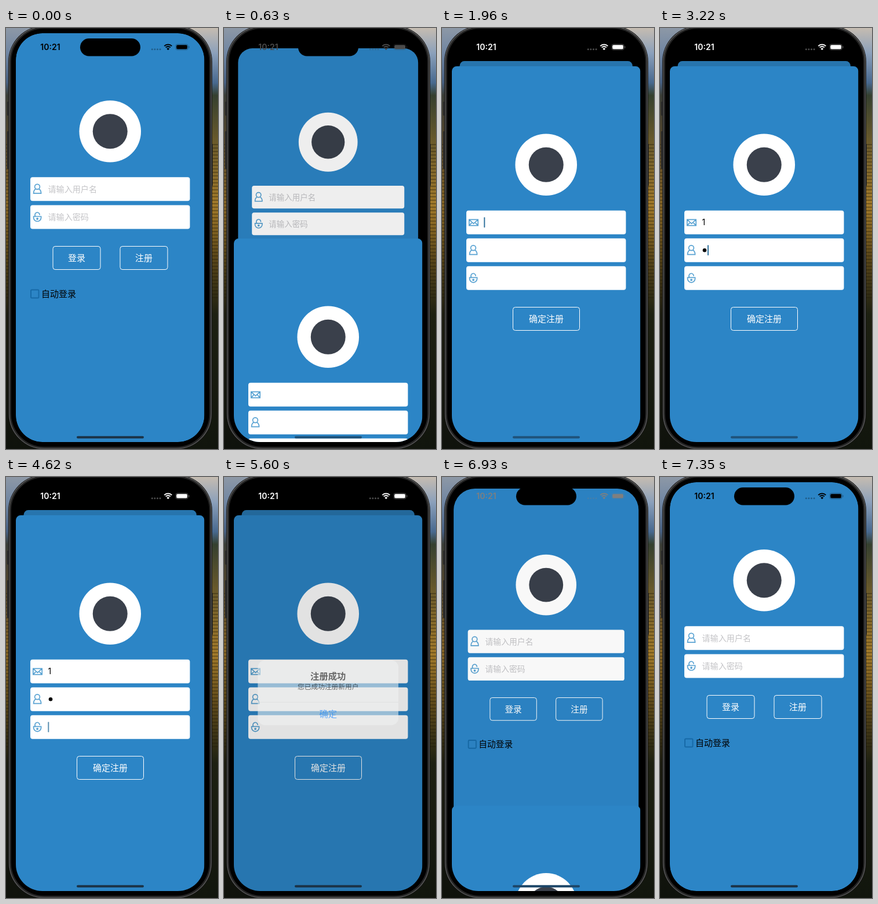
Animation, 366 px wide and 726 px high, one loop 8000 ms. Source, as an HTML page with a canvas:

```html
<!DOCTYPE html>
<html lang="zh">
<head>
<meta charset="utf-8">
<title>注册</title>
<style>
html, body { margin: 0; width: 100%; height: 100%; overflow: hidden; background: #000; }
canvas { display: block; width: 366px; height: 726px; }
</style>
</head>
<body>
<canvas id="stage"></canvas>
<script>
const W = 366, H = 726, LOOP = 8000;
const BLUE = '#2c85c6', ICON = '#58a2d2', CARET = '#35759f';
const CJK = '"Noto Sans CJK SC", "Noto Sans CJK", "Noto Sans", sans-serif';
const SCREEN = { x: 17, y: 9, w: 325.5, h: 705 };
const CX = 179.75;

const canvas = document.getElementById('stage');
const dpr = window.devicePixelRatio || 1;
canvas.width = W * dpr;
canvas.height = H * dpr;
const ctx = canvas.getContext('2d');

// Critically damped spring, 0 to 1
function spring(t, start, rate) {
  const x = Math.max(0, t - start) / 1000 * rate;
  return 1 - (1 + x) * Math.exp(-x);
}
const clamp = v => Math.min(1, Math.max(0, v));
const mix = (a, b, p) => a + (b - a) * p;
const within = (t, a, b) => t >= a && t < b;
const snap = (v, e) => v < e ? 0 : v > 1 - e ? 1 : v;

function box(x, y, w, h, r) {
  ctx.beginPath();
  ctx.roundRect(x, y, w, h, r);
}
function fillBox(x, y, w, h, r, color) {
  box(x, y, w, h, r);
  ctx.fillStyle = color;
  ctx.fill();
}
function strokeBox(x, y, w, h, r, color, width) {
  box(x, y, w, h, r);
  ctx.strokeStyle = color;
  ctx.lineWidth = width;
  ctx.stroke();
}
function disc(x, y, r, color) {
  ctx.beginPath();
  ctx.arc(x, y, r, 0, Math.PI * 2);
  ctx.fillStyle = color;
  ctx.fill();
}
function label(str, x, cy, size, color, align = 'left', weight = 400) {
  ctx.font = `${weight} ${size}px ${CJK}`;
  ctx.textAlign = align;
  ctx.fillStyle = color;
  ctx.fillText(str, x, cy + size * 0.38);
}

function wallpaper() {
  const strip = (x, w, colors) => {
    const g = ctx.createLinearGradient(0, 0, 0, H);
    const at = [0, 0.06, 0.13, 0.16, 0.27, 0.42, 0.54, 0.68, 1];
    colors.forEach((c, i) => g.addColorStop(at[i], c));
    ctx.fillStyle = g;
    ctx.fillRect(x, 0, w, H);
  };
  strip(0, 183, ['#8d98a6', '#7086a3', '#465f80', '#3a3d36', '#54462b', '#866526', '#564317', '#1c1c10', '#0f120c']);
  strip(183, 183, ['#c5bcb1', '#8ba0bb', '#48698f', '#35402f', '#6a5a2b', '#a27a2a', '#5d4819', '#1d2011', '#11150d']);
  ctx.fillStyle = 'rgba(30,24,8,.35)';
  for (let y = 200; y < 470; y += 6) ctx.fillRect(0, y, W, 2);
}

function phoneBody() {
  fillBox(1.8, 127, 4, 24, 1, '#2b2b2b');
  fillBox(1.8, 178, 4, 65, 1, '#2b2b2b');
  fillBox(354, 200, 3, 72, 1, '#2b2b2b');
  fillBox(4, -4, 352, 731, 62, '#161616');
  strokeBox(5.8, -2.2, 348.4, 727.4, 60, '#626262', 1.3);
  strokeBox(7.8, -0.2, 344.4, 723.4, 58, '#262626', 2);
  fillBox(9, 1, 342, 721, 57, '#000');
}

const icons = {
  user(y) {
    ctx.beginPath();
    ctx.arc(54, y - 4, 4.4, 0, Math.PI * 2);
    ctx.moveTo(51, y);
    ctx.quadraticCurveTo(47.6, y + 2, 47.6, y + 7.4);
    ctx.lineTo(60.6, y + 7.4);
    ctx.quadraticCurveTo(60.6, y + 2, 57, y);
    ctx.stroke();
  },
  lock(y) {
    ctx.beginPath();
    ctx.arc(54, y - 4, 4, Math.PI * 0.85, Math.PI * 2.05);
    ctx.moveTo(50, y - 4);
    ctx.lineTo(50, y - 1);
    ctx.moveTo(47.6, y - 1);
    ctx.lineTo(60.6, y - 1);
    ctx.arc(54.1, y + 1, 6.5, 0, Math.PI);
    ctx.closePath();
    ctx.stroke();
    disc(54.1, y + 3, 1.9, ICON);
  },
  mail(y) {
    ctx.beginPath();
    ctx.rect(46.8, y - 5, 15.4, 10.4);
    ctx.moveTo(46.8, y - 5);
    ctx.lineTo(54.5, y + 2);
    ctx.lineTo(62.2, y - 5);
    ctx.moveTo(46.8, y + 5.4);
    ctx.lineTo(51.8, y);
    ctx.moveTo(62.2, y + 5.4);
    ctx.lineTo(57.2, y);
    ctx.stroke();
  }
};

function field(cy, icon, hint) {
  fillBox(42, cy - 20.5, 275.5, 41, 4, '#fff');
  ctx.strokeStyle = ICON;
  ctx.lineWidth = 1.7;
  icons[icon](cy);
  if (hint) label(hint, 72.5, cy, 14.1, '#c4c4c7');
}
function button(str, x, y, w, pressed) {
  strokeBox(x + 0.5, y + 0.5, w - 1, 40, 4, '#fff', 1);
  label(str, x + w / 2, y + 20.5, 15, pressed ? 'rgba(255,255,255,.45)' : '#fff', 'center');
}
function badge(y) {
  disc(CX, y, 53.3, '#fff');
  disc(CX, y, 30, '#3a404b');
}
function caret(x, cy) {
  fillBox(x, cy - 9, 2, 18, 1, CARET);
}

function login(t, p) {
  const k = 1 - 0.083 * p;
  ctx.save();
  ctx.translate(CX, SCREEN.y + 48 * p);
  ctx.scale(k, k);
  ctx.translate(-CX, -SCREEN.y);
  box(SCREEN.x, SCREEN.y, SCREEN.w, SCREEN.h, mix(46, 9, p));
  ctx.clip();
  ctx.fillStyle = BLUE;
  ctx.fillRect(0, 0, W, H);
  badge(178.3);
  field(277.7, 'user', '请输入用户名');
  field(326, 'lock', '请输入密码');
  button('登录', 80.5, 376, 83);
  button('注册', 196.5, 376, 83, within(t, 140, 540));
  strokeBox(43, 451.5, 13.5, 14, 1.5, '#176aa8', 2);
  label('自动登录', 61, 458.3, 15, '#000');
  ctx.fillStyle = `rgba(0,0,0,${0.12 * p})`;
  ctx.fillRect(0, 0, W, H);
  ctx.restore();
}

function sheet(t, p) {
  ctx.save();
  ctx.translate(0, 650 * (1 - p));
  fillBox(SCREEN.x, 66, SCREEN.w, 670, [8.3, 8.3, 0, 0], BLUE);
  badge(235.7);
  const rows = [335.3, 383.3, 431.3];
  ['mail', 'user', 'lock'].forEach((name, i) => field(rows[i], name));
  button('确定注册', 122, 481, 116, within(t, 5250, 5450));

  if (within(t, 2380, 5450)) {
    ctx.font = '400 14.1px Inter, sans-serif';
    ctx.textAlign = 'left';
    ctx.fillStyle = '#000';
    ctx.fillText('1', 72.5, 340.4);
  }
  if (within(t, 3220, 5450)) disc(77, rows[1], 3.3, '#000');
  if (within(t, 4970, 5450)) disc(77, rows[2], 3.3, '#000');

  if (within(t, 1960, 2380)) caret(72.3, rows[0]);
  if (within(t, 2380, 2870)) caret(80, rows[0]);
  if (within(t, 2870, 3220)) caret(72.3, rows[1]);
  if (within(t, 3220, 3570)) caret(82, rows[1]);
  if (within(t, 4620, 4970) || within(t, 6580, 7350)) {
    ctx.globalAlpha = t < 6000 ? clamp(0.8 + (t - 4620) / 350) : 1;
    caret(72.3, rows[2]);
    ctx.globalAlpha = 1;
  }
  if (within(t, 4970, 5450)) caret(82, rows[2]);
  ctx.restore();
}

function statusBar(white) {
  const v = Math.round(255 * white), ink = `rgb(${v},${v},${v})`;
  fillBox(128, 18, 104, 30.5, 15.2, '#000');
  ctx.font = '600 14px Inter, sans-serif';
  ctx.textAlign = 'center';
  ctx.fillStyle = ink;
  ctx.fillText('10:21', 76.5, 38);

  ctx.globalAlpha = 0.3;
  for (let i = 0; i < 4; i++) disc(252.3 + i * 4.6, 36.7, 1.5, ink);
  strokeBox(292.9, 27.9, 21.4, 10, 3.2, ink, 0.9);
  fillBox(315.2, 31, 1.3, 4, 0.7, ink);
  ctx.globalAlpha = 1;
  fillBox(294.2, 29.2, 18.8, 7.4, 2, ink);

  ctx.strokeStyle = ink;
  ctx.lineWidth = 2;
  for (const r of [9.2, 5.7]) {
    ctx.beginPath();
    ctx.arc(279.8, 37.6, r, Math.PI * 1.25, Math.PI * 1.75);
    ctx.stroke();
  }
  ctx.beginPath();
  ctx.moveTo(279.8, 38.2);
  ctx.arc(279.8, 38.2, 3.4, Math.PI * 1.25, Math.PI * 1.75);
  ctx.closePath();
  ctx.fillStyle = ink;
  ctx.fill();
}

function alertBox(t, grow, alpha) {
  const k = 1.2 - 0.2 * grow;
  ctx.fillStyle = `rgba(0,0,0,${0.2 * alpha})`;
  ctx.fillRect(0, 0, W, H);
  ctx.save();
  ctx.globalAlpha = alpha;
  ctx.translate(CX, 372);
  ctx.scale(k, k);
  box(-111.6, -51.5, 223.2, 103, 11.5);
  ctx.clip();
  ctx.fillStyle = '#f0f2f3';
  ctx.fillRect(-112, -52, 224, 104);
  if (within(t, 6160, 6300)) {
    ctx.fillStyle = '#dfe2e4';
    ctx.fillRect(-112, 15, 224, 37);
  }
  ctx.fillStyle = '#c9cccf';
  ctx.fillRect(-112, 14.6, 224, 0.6);
  label('注册成功', 0, -26.7, 14.1, '#000', 'center', 700);
  label('您已成功注册新用户', 0, -9.2, 10.8, '#000', 'center');
  label('确定', 0, 33.2, 14.1, '#007aff', 'center');
  ctx.restore();
}

function homeBar(t) {
  let color = '#1b3347';
  if (within(t, 560, 3570)) color = '#1f527a';
  else if (within(t, 6580, 7280)) color = '#1d4668';
  fillBox(122, 703.7, 116, 4, 2, color);
}

function draw(t) {
  const rise = snap(spring(t, 540, 20) - spring(t, 6775, 18), 0.001);
  const white = clamp((t - 540) / 310) - clamp((t - 6775) / 310);
  const grow = spring(t, 5440, 11.7);
  const alpha = snap(grow - spring(t, 6290, 22), 0.005);

  ctx.setTransform(dpr, 0, 0, dpr, 0, 0);
  wallpaper();
  phoneBody();
  ctx.save();
  box(SCREEN.x, SCREEN.y, SCREEN.w, SCREEN.h, 46);
  ctx.clip();
  login(t, rise);
  if (rise > 0) sheet(t, rise);
  if (alpha > 0) alertBox(t, grow, alpha);
  statusBar(white);
  homeBar(t);
  ctx.restore();
}

const begin = performance.now();
function tick() {
  draw((performance.now() - begin) % LOOP);
  requestAnimationFrame(tick);
}
tick();
</script>
</body>
</html>
```
